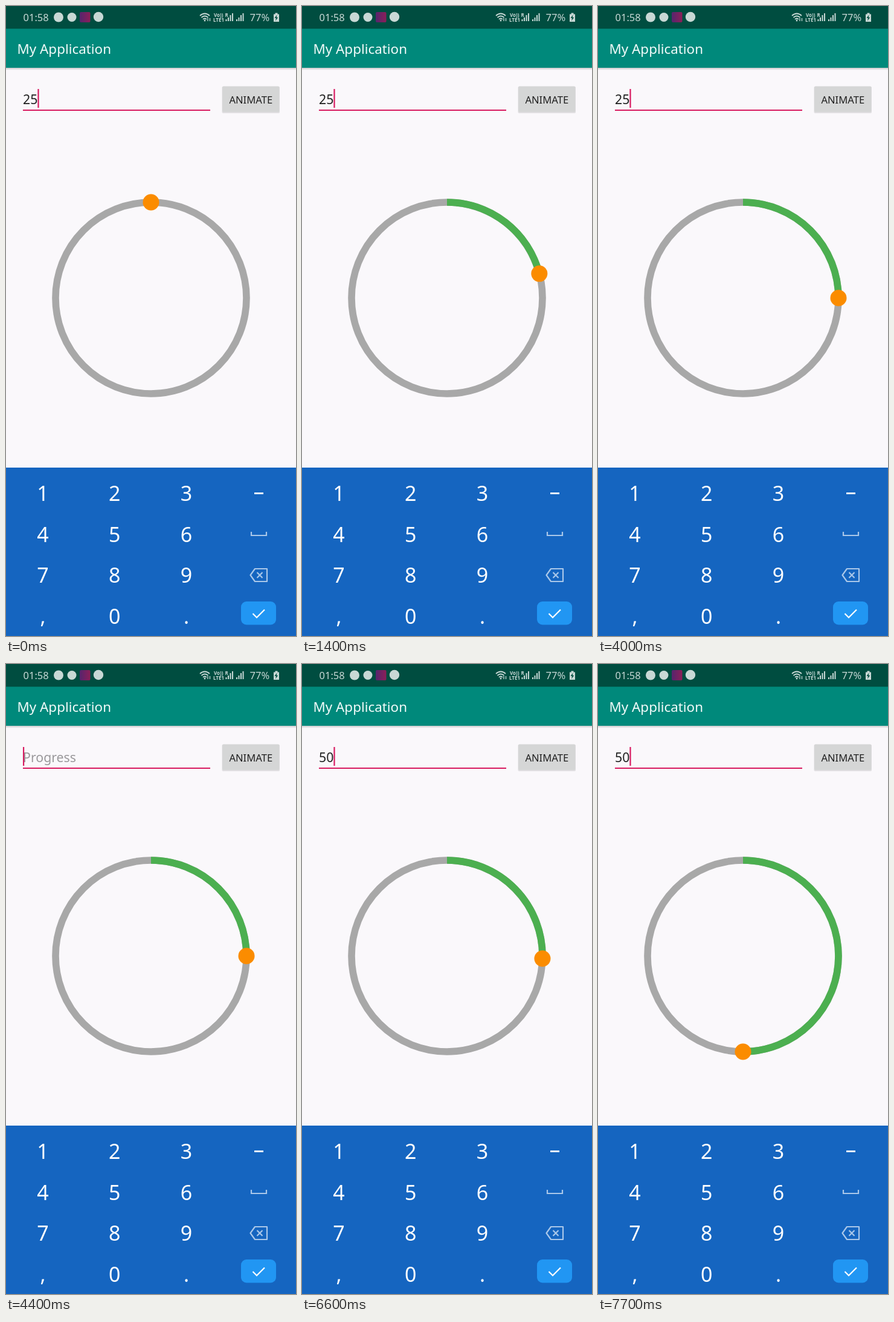
An HTML page that plays this animation: 480x1040 px, repeating every 8000 ms.

```html
<!DOCTYPE html>
<html lang="en">
<head>
<meta charset="utf-8">
<title>Circular progress</title>
<style>
html, body { margin: 0; width: 100%; height: 100%; overflow: hidden; background: #faf8fb; }
svg { display: block; width: 100%; height: 100%; }
text { font-family: "Noto Sans", "Open Sans", sans-serif; }
</style>
</head>
<body>
<svg viewBox="0 0 480 1040">
  <defs>
    <linearGradient id="shade" x2="0" y2="1">
      <stop stop-color="#000" stop-opacity=".2"/>
      <stop offset="1" stop-color="#000" stop-opacity="0"/>
    </linearGradient>
    <linearGradient id="badge" x2="1" y2="0">
      <stop stop-color="#55256e"/>
      <stop offset="1" stop-color="#8c1f58"/>
    </linearGradient>
  </defs>
  <rect width="480" height="1040" fill="#faf8fb"/>

  <!-- status bar -->
  <rect width="480" height="38" fill="#004d40"/>
  <g fill="#c8d8d5">
    <text x="28.5" y="25" font-size="16.5">01:58</text>
    <circle cx="87" cy="18.5" r="8"/>
    <circle cx="109" cy="18.5" r="7.5"/>
    <rect x="122" y="10" width="17.500" height="17" rx="2" fill="url(#badge)"/>
    <circle cx="153" cy="18" r="8.200"/>
    <g fill="none" stroke="#c8d8d5" stroke-width="1.700">
      <path d="M321 16q8-7 16 0M323.500 19q5.500-5 11 0M326 22q3-3 6 0"/>
      <path d="M334 20v5M337.500 20v5" stroke-width="1.300"/>
    </g>
    <circle cx="329" cy="24" r="1.400"/>
    <g font-weight="600">
      <text x="344" y="17.500" font-size="8">Vo))</text>
      <text x="343" y="25.500" font-size="8">LTE1</text>
      <text x="362.500" y="18" font-size="8">R</text>
    </g>
    <path d="M363.500 22h2v3h-2zM367 19h2v6h-2zM370.500 15h2v10h-2zM374 12h2v13h-2z"/>
    <path d="M381 22h2v3h-2zM384.500 19h2v6h-2zM388 15h2v10h-2zM391.500 12h2v13h-2z"/>
    <text x="403.500" y="25" font-size="16.500">77%</text>
    <path d="M445.500 11.500h4v2h2.500v12.500h-9v-12.500h2.500z"/>
    <path d="M448.500 14.500l-4 5.500h2.500l-.8 4.500 4-5.800h-2.500z" fill="#004d40"/>
  </g>

  <!-- app bar -->
  <rect y="37.500" width="480" height="64.500" fill="#00897b"/>
  <rect y="102" width="480" height="4" fill="url(#shade)"/>
  <text x="18.500" y="78.500" font-size="22.400" fill="#f2fbfa">My Application</text>

  <!-- input row -->
  <text id="entry" x="28" y="162" font-size="21.300"></text>
  <rect x="28" y="171" width="310" height="2" fill="#d81b60"/>
  <rect id="cursor" y="137" width="2.200" height="31" fill="#d81b60"/>
  <rect x="357.500" y="133" width="95.500" height="44" rx="2" fill="#000" opacity=".1"/>
  <rect x="358" y="132.500" width="94.500" height="42.500" rx="2" fill="#d5d6d6"/>
  <text x="405.300" y="160.500" font-size="16.600" fill="#202020" text-anchor="middle">ANIMATE</text>

  <!-- progress ring -->
  <g fill="none" stroke-width="11.600">
    <circle cx="240" cy="482" r="158" stroke="#a8a8a8"/>
    <path id="arc" stroke="#4caf50"/>
  </g>
  <circle id="dot" r="13.500" fill="#fb8c00"/>

  <!-- keyboard -->
  <rect y="762" width="480" height="278" fill="#1565c0"/>
  <g id="keys" font-size="34" fill="#fff" text-anchor="middle"></g>
  <path d="M411 804.500h15" stroke="#fff" stroke-width="2.800"/>
  <g fill="none" stroke="#a9c7e9" stroke-width="2.200">
    <path d="M406 868v6h25v-6"/>
    <path d="M412 929h20v21h-20l-7.500-10.500zM415.500 935l9 9M424.500 935l-9 9" stroke-linejoin="round"/>
  </g>
  <rect x="389" y="983" width="58" height="38.500" rx="9" fill="#2196f3"/>
  <path d="M408.500 1003l6.500 6.500 13-13" fill="none" stroke="#fff" stroke-width="2.200"/>
</svg>
<script>
const LOOP = 8000, STEP = 100, SWEEP = 1200;
const byId = id => document.getElementById(id);
const [entry, cursor, arc, dot, keys] = ["entry", "cursor", "arc", "dot", "keys"].map(byId);

["123", "456", "789", ",0."].forEach((row, r) => [...row].forEach((label, c) => {
  const key = document.createElementNS("http://www.w3.org/2000/svg", "text");
  key.setAttribute("x", 61 + c * 118.8);
  key.setAttribute("y", 817 + r * 67.5);
  key.textContent = label;
  keys.append(key);
}));

const typing = [[0, "25"], [4200, "2"], [4400, ""], [5000, "5"], [5400, "50"]];
const blinkResets = [0, 4400, 5000, 5500];
const sweeps = [[518, 0, 90], [6500, 90, 180]];

const ease = x => (1 - Math.cos(Math.PI * Math.min(1, Math.max(0, x)))) / 2;

function setAttributes(element, values) {
  for (const name in values) element.setAttribute(name, values[name]);
}

function draw(t) {
  const value = typing.findLast(([start]) => start <= t)[1];
  entry.textContent = value || "Progress";
  entry.setAttribute("fill", value ? "#202020" : "#9b999c");

  const blinkStart = blinkResets.findLast(start => start <= t);
  const visible = Math.floor((t - blinkStart) / 500) % 2 === 0;
  setAttributes(cursor, { x: 28 + value.length * 12.2, opacity: visible ? 1 : 0 });

  const [start, from, to] = sweeps.findLast(([start]) => start <= t) || sweeps[0];
  const angle = (from + (to - from) * ease((t - start) / SWEEP)) * Math.PI / 180;
  const x = 240 + 158 * Math.sin(angle), y = 482 - 158 * Math.cos(angle);
  arc.setAttribute("d", angle ? `M240 324A158 158 0 0 1 ${x} ${y}` : "");
  setAttributes(dot, { cx: x, cy: y });
}

const origin = performance.now();
function tick() {
  const t = (performance.now() - origin) % LOOP;
  draw(Math.floor(t / STEP) * STEP);
  requestAnimationFrame(tick);
}
tick();
</script>
</body>
</html>
```
